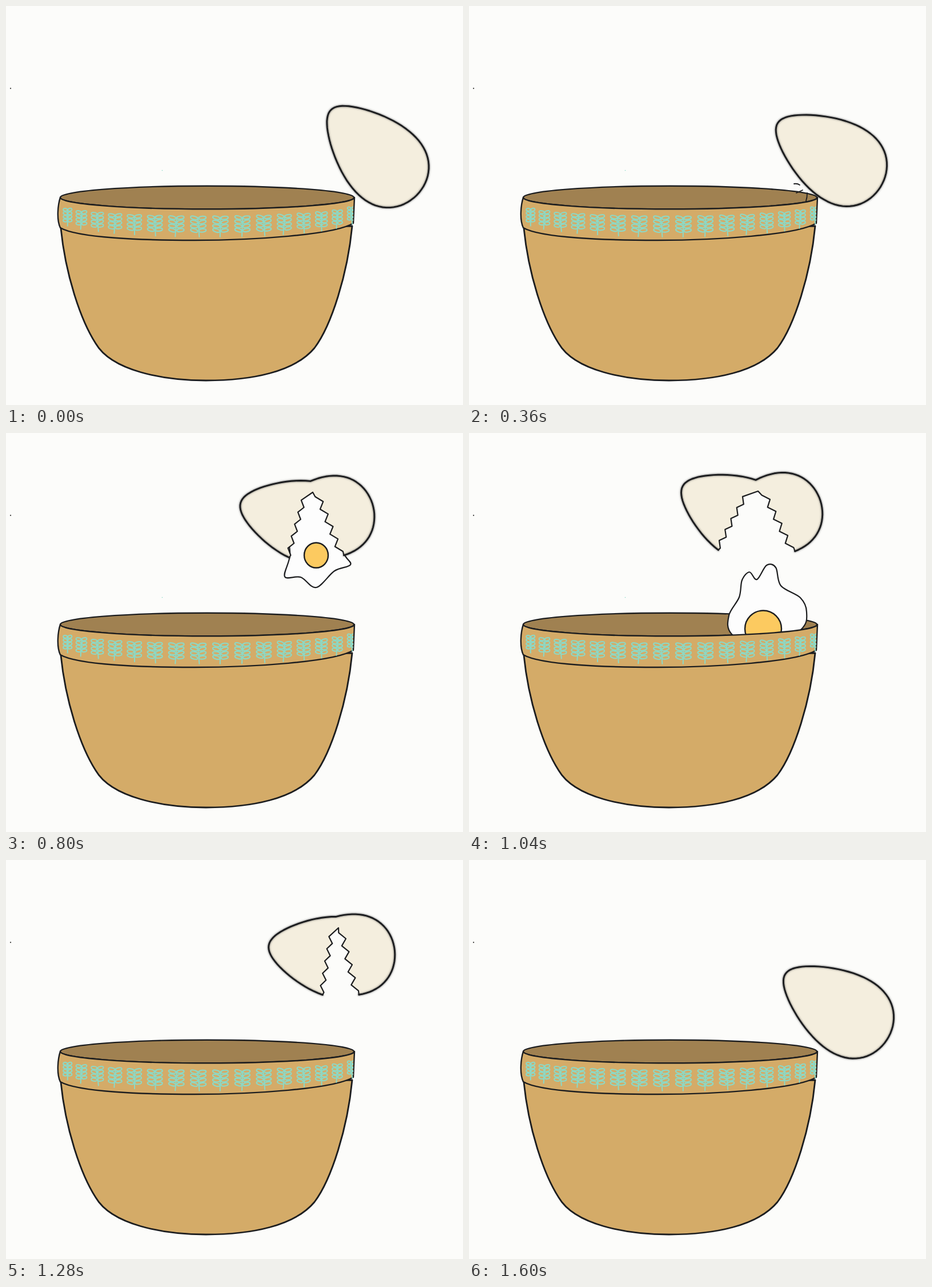
Animation of 800x700 px, one loop 1.64 s. Source, as an HTML page:

```html
<!DOCTYPE html>
<html lang="en">
<head>
<meta charset="utf-8">
<title>Cracking an egg</title>
<style>
  html, body { margin: 0; width: 100%; height: 100%; overflow: hidden; background: #fcfcfa; }
  svg { display: block; width: 100vw; height: 100vh; }
  path, ellipse { stroke-linejoin: round; stroke-linecap: round; }
  .ink { fill: none; stroke: #1c1d1f; }
  .leaf { fill: none; stroke: #8cd9c6; stroke-width: 2; }
</style>
</head>
<body>
<svg viewBox="0 0 800 700">
  <defs>
    <filter id="soft" x="-20%" y="-20%" width="140%" height="140%"><feGaussianBlur stdDeviation="1.6"/></filter>
    <clipPath id="band"><path d="M90 330H608V412H90Z"/></clipPath>
  </defs>
  <rect width="800" height="700" fill="#fcfcfa"/>
  <circle cx="8" cy="144.5" r="1.1" fill="#222"/>
  <circle id="speck" cx="273.5" cy="288.5" r=".8" fill="#8cd9c6"/>

  <ellipse cx="352" cy="336" rx="257" ry="20.3" fill="#a08151" stroke="#1c1d1f" stroke-width="2.4"/>

  <g id="drop">
    <path id="white" fill="#fdfdfd" stroke="#1c1d1f" stroke-width="2.2"/>
    <ellipse id="yolk" fill="#fcca60" stroke="#1c1d1f" stroke-width="2.4"/>
  </g>

  <g fill="#d4ab68" stroke="#1c1d1f" stroke-width="2.8">
    <path d="M96 390C104 470 130 550 157 592C185 640 275 657 350 657C430 657 505 642 540 600C570 560 598 470 606 386Z"/>
    <path d="M95 336C91 348 88 374 95 389C125 407 240 411 330 411C430 411 575 402 608 381L610 336A257 20.3 0 0 1 95 336Z" stroke-width="2.4"/>
  </g>
  <g id="sprigs" clip-path="url(#band)"></g>

  <path id="marks" class="ink" stroke-width="1.8" d="M569 312Q575 311 579 314M573 328L584 323M592 328Q592 336 590 342"/>

  <path id="shell" fill="#f4eede"/>
  <path id="halo" class="ink" stroke-width="4" opacity=".5" filter="url(#soft)"/>
  <path id="rim" class="ink" stroke-width="2.9"/>
  <path id="edge" class="ink" stroke-width="2.2"/>
  <path id="crack" fill="#fdfdfd" stroke="#1c1d1f" stroke-width="2"/>
</svg>
<script>
const $ = id => document.getElementById(id);
const set = (id, attrs) => { for (const k in attrs) $(id).setAttribute(k, attrs[k]); };
const show = (id, on) => set(id, { visibility: on ? 'visible' : 'hidden' });
const mix = (a, b, k) => a + (b - a) * k;
const clamp = v => Math.max(0, Math.min(1, v));
const range = (n, f) => Array.from({ length: n }, (_, i) => f(i));
const LOOP = 1640;

// start and length of the drawing steps
const RUNS = [[0, 40], [40, 80], [440, 40], [520, 80], [600, 40], [640, 80], [1040, 40], [1200, 80]];

// time, hinge x, hinge y, turn of the left half, turn of the right half
const POSES = [
  [0, 701, 215.5, 45, 45],
  [200, 728, 211, 55, 55],
  [360, 676.7, 208, 32, 32],
  [640, 612, 123, 7, 5],
  [800, 533, 84, 15.5, -14.5],
  [1040, 502, 82, 28, -19],
  [1280, 578, 99, 9.8, -6.5],
  [1600, 690, 205, 33, 33],
  [LOOP, 701, 215.5, 45, 45]
];

// egg white while it leaves the shell and when it reaches the bowl
const SPILL = [[530, 96], [542, 96], [562, 115], [578, 165], [592, 212], [603, 231], [575, 242],
  [543, 271], [516, 253], [488, 252], [497, 215], [495, 168], [516, 110]];
const LAND = [[504, 257], [521, 232], [537, 236], [546, 268], [580, 289], [591, 314], [581, 345],
  [515, 385], [460, 353], [455, 320], [473, 288], [478, 258], [491, 244]];

const pt = p => p[0].toFixed(1) + ' ' + p[1].toFixed(1);
const line = pts => pts.map(pt).join('L');

function place(pts, x, y, deg) {
  const a = deg * Math.PI / 180, c = Math.cos(a), s = Math.sin(a);
  return pts.map(([u, v]) => [x + u * c - v * s, y + u * s + v * c]);
}

// closed curve through the points
function smooth(pts) {
  const n = pts.length, at = i => pts[(i + n) % n];
  return 'M' + pt(pts[0]) + pts.map((b, i) => {
    const a = at(i - 1), c = at(i + 1), e = at(i + 2);
    const lean = (p, from, to, k) => [p[0] + (to[0] - from[0]) * k, p[1] + (to[1] - from[1]) * k];
    return 'C' + [lean(b, a, c, 1 / 6), lean(c, b, e, -1 / 6), c].map(pt).join(' ');
  }).join('');
}

// egg outline around the hinge at 0,0, from one angle to another; short draws in the tip
const arc = (from, to, short = 0) => range(41, i => {
  const a = mix(from, to, i / 40), c = Math.cos(a), x = -11 + 106 * c;
  return [x < 0 ? x * (1 - short) : x, 70 - 67.6 * Math.sin(a) * (1 + .34 * c)];
});
const angle = x => Math.acos((x + 11) / 106);

const zigzag = (a, b, n, amp) => range(n, i =>
  [mix(a[0], b[0], i / (n - 1)) + (i % 2 ? amp : -amp), mix(a[1], b[1], i / (n - 1))]);

const ZIG_L = zigzag([-2.5, 135], [-2.5, 37], 10, -4);
const ZIG_R = zigzag([6, 29], [19, 134], 10, 5);
const CRACK = [[-2, 54], ...zigzag([-2, 64], [-17, 138], 8, -3.5), [-9, 151], ...zigzag([0, 137], [4, 65], 7, -3.5)];

// smooth path through the poses
function pose(t) {
  const i = POSES.findIndex(p => p[0] > t), a = POSES[i - 1], b = POSES[i];
  const z = POSES[i - 2] || a, c = POSES[i + 1] || b;
  const d = b[0] - a[0], u = (t - a[0]) / d;
  return a.map((v, j) => {
    const m = (b[j] - z[j]) / (b[0] - z[0]) * d, n = (c[j] - v) / (c[0] - a[0]) * d;
    const bend = u * (1 - u) * (m * (1 - u) - n * u);
    return mix(v, b[j], u * u * (3 - 2 * u)) + bend;
  }).slice(1);
}

function drawEgg(t) {
  const [x, y, l, r] = pose(t), open = l - r > 6;
  const left = place(arc(angle(0), 2 * Math.PI - angle(0), .08 * clamp((l - r) / 16)), x, y, l);
  const right = place(arc(-angle(open ? 24 : 0), angle(0)), x, y, r);
  const start = left[left.length - 1];
  const zig = open ? [start, ...place(ZIG_L, x, y, l), [x + 4, y + 20], ...place(ZIG_R, x, y, r), right[0]] : [];
  const rim = 'M' + line(left) + (open ? 'M' : 'L') + line(right);
  set('shell', { d: 'M' + line([...left, ...zig, ...right]) + 'Z' });
  set('halo', { d: rim });
  set('rim', { d: rim });
  set('edge', { d: open ? 'M' + line(zig) : '' });

  const grow = t < 1280 ? clamp((t - 440) / 200) : 0;
  const part = CRACK.map(([u, v]) => [mix(-9, u, grow), mix(151, v, grow)]);
  set('crack', { d: !open && grow ? 'M' + line(place(part, x, y, (l + r) / 2 - 6)) + 'Z' : '' });
}

function drawWhite(t) {
  const on = t >= 720 && t < 1160;
  show('drop', on);
  if (!on) return;
  const u = clamp((t - 800) / 240), k = u * (.65 + .35 * u);
  const early = t < 800, sink = Math.max(0, t - 1040) * 1.2;
  const fit = ([x, y]) => early ? [575 + (x - 536) * .62, 119 + (y - 102) * .85] : [x, y + sink];
  set('white', { d: smooth(SPILL.map((p, i) => fit(p.map((v, j) => mix(v, LAND[i][j], k))))) });
  const [cx, cy] = fit([mix(543, 515, k), mix(214.5, 343.5, k)]);
  const size = early ? 14 : mix(21, 32, k);
  set('yolk', { cx, cy, rx: size, ry: size + 1 - k });
}

// sprigs follow the curve of the rim and narrow toward its ends
function sprig(i) {
  const x = 356 + 303 * Math.sin((i / 7.5 - 1) * .96);
  const s = Math.sqrt(1 - ((x - 352) / 257) ** 2);
  const top = 348 + 20 * s, stem = 29 + 8 * s, w = 10 + 18 * s, gap = stem * .2;
  const lean = 2 * Math.sin(i * 2.4);
  let out = `<path class="leaf" d="M${x + lean / 2} ${top + 3}L${x - lean} ${top + stem}"/>`;
  for (let j = 0; j < 8; j++) {
    const side = j % 2 ? 1 : -1, cx = x + side * w * .26, cy = top + gap * ((j >> 1) + .5);
    const turn = -side * (6 + 12 * Math.sin(i * 3 + j) ** 2);
    out += `<ellipse class="leaf" cx="${cx}" cy="${cy}" rx="${w * .23}" ry="${gap * .38}" transform="rotate(${turn} ${cx} ${cy})"/>`;
  }
  return out;
}
$('sprigs').innerHTML = range(16, sprig).join('');

function frame() {
  const now = performance.now() % LOOP;
  const [from, step] = RUNS.filter(r => r[0] <= now).pop();
  const t = from + Math.floor((now - from) / step) * step;
  drawEgg(t);
  drawWhite(t);
  show('marks', t === 360);
  show('speck', t < 1160);
  requestAnimationFrame(frame);
}
frame();
</script>
</body>
</html>
```
